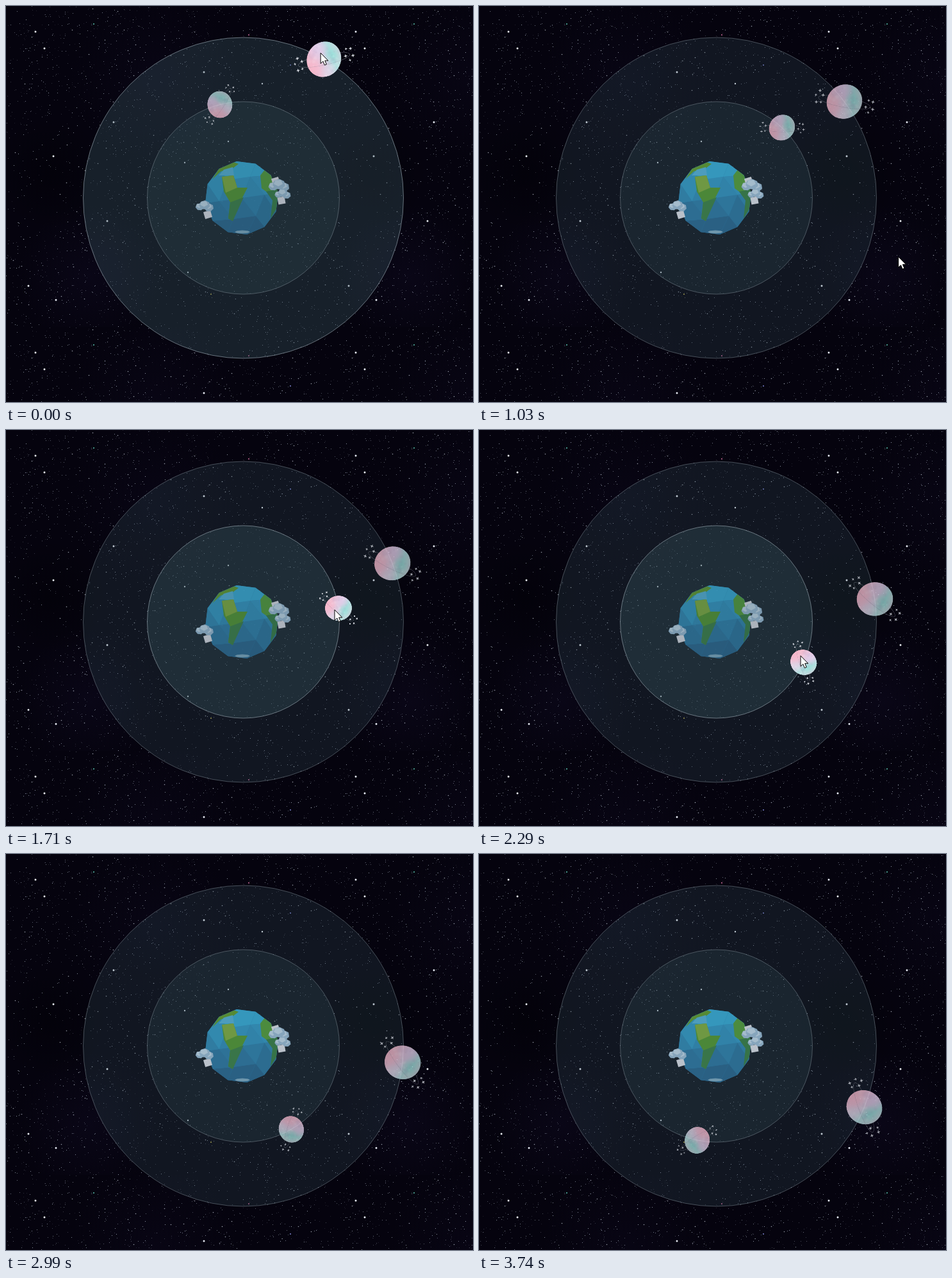
An HTML page with a canvas for the animation above (3840 ms loop, 729 px wide and 617 px high).

```html
<!DOCTYPE html>
<html lang="en">
<head>
<meta charset="utf-8">
<title>Planet orbits</title>
<style>
html, body { margin: 0; width: 100%; height: 100%; overflow: hidden; background: #04020d; }
canvas { display: block; }
</style>
</head>
<body>
<canvas id="stage" width="729" height="617"></canvas>
<script>
const W = 729, H = 617, LOOP = 3840, TAU = Math.PI * 2, DEG = Math.PI / 180;
const CENTER = { x: 370.5, y: 299 };
const ctx = document.getElementById('stage').getContext('2d');

// time, orbit phase in degrees
const PHASE = [[0, 0], [510, 27.6], [2290, 129], [2990, 164.2], [3740, 205.7]];
// time, pointer tip x, y
const POINTER = [
  [0, 491, 73], [510, 547, 141], [950, 659, 382], [1030, 655, 391],
  [1550, 513, 272], [1710, 513, 280], [2290, 502, 351], [2680, 525, 640]
];
const ORBITS = [
  { radius: 250, start: -59.8, speed: 0.4, scale: 1, reach: 54 },
  { radius: 150, start: -104.2, speed: 1, scale: 0.74, reach: 38 }
];

function sample(keys, t) {
  const last = keys[keys.length - 1];
  if (t >= last[0]) return last.slice(1);
  const i = keys.findIndex(k => k[0] > t);
  const a = keys[i - 1], b = keys[i];
  const u = (t - a[0]) / (b[0] - a[0]);
  return a.slice(1).map((v, j) => v + (b[j + 1] - v) * u);
}

function layer(w, h, paint) {
  const c = document.createElement('canvas');
  c.width = w;
  c.height = h;
  paint(c.getContext('2d'));
  return c;
}

function seeded(seed) {
  return () => (seed = (seed * 16807) % 2147483647) / 2147483647;
}

function disc(g, x, y, r, color) {
  g.fillStyle = color;
  g.beginPath();
  g.arc(x, y, r, 0, TAU);
  g.fill();
}

function poly(g, color, ...points) {
  g.fillStyle = color;
  g.beginPath();
  points.forEach(p => g.lineTo(p[0], p[1]));
  g.closePath();
  g.fill();
}

function ngon(x, y, rx, ry, n, turn) {
  return Array.from({ length: n }, (_, i) => {
    const a = turn + i * TAU / n;
    return [x + rx * Math.cos(a), y + ry * Math.sin(a)];
  });
}

function glow(g, x, y, r, rgb, alpha) {
  const grad = g.createRadialGradient(x, y, 0, x, y, r);
  grad.addColorStop(0, `rgba(${rgb},${alpha})`);
  grad.addColorStop(1, `rgba(${rgb},0)`);
  g.fillStyle = grad;
  g.fillRect(x - r, y - r, 2 * r, 2 * r);
}

const starTile = layer(500, 500, g => {
  const rnd = seeded(4711);
  const spot = () => Math.floor(rnd() * 500);
  g.fillStyle = '#05030e';
  g.fillRect(0, 0, 500, 500);
  glow(g, 230, 110, 130, '20,14,42', 0.2);
  glow(g, 130, 420, 110, '20,14,42', 0.3);
  glow(g, 70, 260, 90, '0,0,4', 0.4);
  for (let i = 0; i < 3000; i++) {
    const x = spot(), y = spot();
    const inVoid = Math.hypot(x - 70, y - 260) < 90;
    if (inVoid && rnd() < 0.6) continue;
    g.fillStyle = `rgba(205,215,235,${0.12 + 0.58 * rnd() ** 2})`;
    g.fillRect(x, y, 1, 1);
  }
  for (let i = 0; i < 90; i++) disc(g, spot() + 0.5, spot() + 0.5, 0.8, 'rgba(225,232,245,.65)');
  const bright = [
    [46, 40], [60, 66], [74, 234], [168, 181], [309, 103], [158, 335],
    [35, 436], [78, 458], [284, 415], [347, 211], [279, 244], [400, 121]
  ];
  bright.forEach(([x, y], i) => disc(g, x, y, i < 8 ? 1.5 : 1.2, '#e9edf5'));
  ['#b6a94a', '#7d83d0', '#58bfae', '#c76a9a'].forEach(c => disc(g, spot(), spot(), 1, c));
});

const sky = layer(W, H, g => {
  g.fillStyle = g.createPattern(starTile, 'repeat');
  g.fillRect(0, 0, W, H);
});

function cloud(g, x, y, s) {
  for (const [dx, dy, r] of [[-8, 1, 7], [7, 2, 8], [0, -2, 9]]) {
    const cx = x + dx * s, cy = y + dy * s;
    poly(g, '#86a5bc', ...ngon(cx, cy, r * s, r * s * 0.85, 7, 0.3));
    poly(g, '#a5bccc', ...ngon(cx - s, cy - 2 * s, r * s * 0.75, r * s * 0.55, 5, 0.3));
  }
}

const earth = layer(W, H, g => {
  const x = 368, y = 299, r = 57.5, turn = -8 * DEG;
  const rim = ngon(x, y, r, r, 12, turn);
  const core = ngon(x, y, r * 0.62, r * 0.62, 6, turn);
  const water = cy => {
    const u = (cy - y) / r;
    return `hsl(${200 + 5 * u},${54 - 3 * u}%,${40.5 - 9 * u}%)`;
  };
  const facet = (...p) => poly(g, water(p.reduce((sum, q) => sum + q[1], 0) / p.length), ...p);

  poly(g, '#2c7ba6', ...rim);
  core.forEach((c, i) => {
    const next = core[(i + 1) % 6], corner = rim[(2 * i + 2) % 12];
    facet([x, y], c, next);
    facet(c, rim[2 * i], rim[2 * i + 1]);
    facet(c, rim[2 * i + 1], corner, next);
  });

  g.save();
  g.beginPath();
  rim.forEach(p => g.lineTo(...p));
  g.clip();
  poly(g, '#568a35', [322, 270], [332, 254], [352, 242], [363, 246], [355, 252], [335, 258]);
  poly(g, '#4d9cbd', [332, 264], [340, 255], [354, 251], [356, 264]);
  poly(g, '#4b8738', [337, 266], [355, 264], [361, 283], [377, 283], [363, 310], [354, 335], [347, 331], [350, 306], [340, 289]);
  poly(g, '#6f9843', [337, 266], [355, 264], [361, 283], [343, 291]);
  poly(g, '#397549', [350, 306], [371, 298], [354, 335], [347, 331]);
  poly(g, '#4c8b3e', [397, 264], [404, 255], [420, 264], [428, 291], [410, 292], [399, 284]);
  poly(g, '#367348', [406, 289], [428, 285], [424, 313], [413, 331], [416, 303]);
  g.restore();

  poly(g, '#6f97ad', ...ngon(369, 352, 12, 2.5, 8, 0));
  const block = (bx, by, tilt) => poly(g, '#bac1ca', ...ngon(bx, by, 8, 8, 4, tilt));
  block(315, 325, 0.5);
  block(421, 273, 0.5);
  block(430, 303, 0.6);
  cloud(g, 310, 312, 0.95);
  cloud(g, 426, 280, 1.1);
  cloud(g, 432, 293, 0.85);
});

function sparkle(g, x, y, r) {
  poly(g, '#d5d8df', ...Array.from({ length: 8 }, (_, i) => {
    const d = i % 2 ? r * 0.38 : r;
    return [x + d * Math.cos(i * TAU / 8), y + d * Math.sin(i * TAU / 8)];
  }));
}

const planet = layer(240, 240, g => {
  const band = (color, end) => {
    g.strokeStyle = color;
    g.lineWidth = 0.7;
    g.beginPath();
    g.ellipse(0, 1, 41, 8, 0, 0, end);
    g.stroke();
  };
  g.translate(120, 120);
  g.scale(2, 2);
  band('rgba(215,220,230,.35)', TAU);

  g.save();
  g.beginPath();
  g.ellipse(0, 0, 28.3, 26.2, -42 * DEG, 0, TAU);
  g.clip();
  const skin = g.createLinearGradient(-26, 6, 27, -3);
  ['#f3b8cb', '#eec3d8', '#dccde2', '#a9dfdd', '#c9d8de'].forEach((c, i) => skin.addColorStop(i / 4, c));
  g.fillStyle = skin;
  g.fillRect(-30, -30, 60, 60);
  glow(g, -7, -19, 20, '226,206,238', 0.7);
  glow(g, -17, 9, 16, '252,178,198', 0.5);
  glow(g, 13, -4, 14, '140,226,216', 0.55);
  glow(g, 6, 23, 17, '222,220,234', 0.7);
  const rnd = seeded(93);
  for (let i = 0; i < 60; i++) {
    glow(g, rnd() * 54 - 27, rnd() * 54 - 27, 2 + rnd() * 3, i % 2 ? '255,255,255' : '170,150,185', 0.16);
  }
  band('rgba(130,125,145,.35)', Math.PI);
  g.restore();

  for (const side of [-1, 1]) {
    ngon(side * 40, 0, 6, 10, 5, side * 0.4).forEach(([x, y], i) => sparkle(g, x, y, i % 2 ? 2.4 : 3));
  }
});

function drawRing(radius, lit) {
  disc(ctx, CENTER.x, CENTER.y, radius, `rgba(59,88,96,${lit ? 0.34 : 0.23})`);
  ctx.strokeStyle = `rgba(165,182,190,${lit ? 0.58 : 0.38})`;
  ctx.lineWidth = 1;
  ctx.beginPath();
  ctx.arc(CENTER.x, CENTER.y, radius, 0, TAU);
  ctx.stroke();
}

function drawPlanet(x, y, angle, scale, lit) {
  ctx.save();
  ctx.translate(x, y);
  ctx.rotate((angle + 47.5) * DEG);
  ctx.scale(scale, scale);
  ctx.globalAlpha = lit ? 1 : 0.75;
  ctx.drawImage(planet, -60, -60, 120, 120);
  ctx.restore();
}

function drawPointer(x, y) {
  ctx.save();
  ctx.translate(x, y);
  poly(ctx, '#fff', [0, 0], [0, 16.5], [3.8, 13], [6.3, 19], [9.2, 17.8], [6.7, 12], [11.8, 12]);
  ctx.strokeStyle = '#000';
  ctx.lineWidth = 1;
  ctx.stroke();
  ctx.restore();
}

function draw(t) {
  const [phase] = sample(PHASE, t);
  const [px, py] = sample(POINTER, t);
  let anyLit = false;
  ctx.drawImage(sky, 0, 0);
  for (const o of ORBITS) {
    const angle = o.start + phase * o.speed;
    const x = CENTER.x + o.radius * Math.cos(angle * DEG);
    const y = CENTER.y + o.radius * Math.sin(angle * DEG);
    const lit = Math.max(Math.abs(px - x), Math.abs(py - y)) < o.reach;
    anyLit = anyLit || lit;
    drawRing(o.radius, lit);
    drawPlanet(x, y, angle, o.scale, lit);
  }
  ctx.globalAlpha = anyLit ? 0.91 : 1;
  ctx.drawImage(earth, 0, 0);
  ctx.globalAlpha = 1;
  drawPointer(px, py);
}

const began = performance.now();
function tick() {
  draw((performance.now() - began) % LOOP);
  requestAnimationFrame(tick);
}
tick();
</script>
</body>
</html>
```
